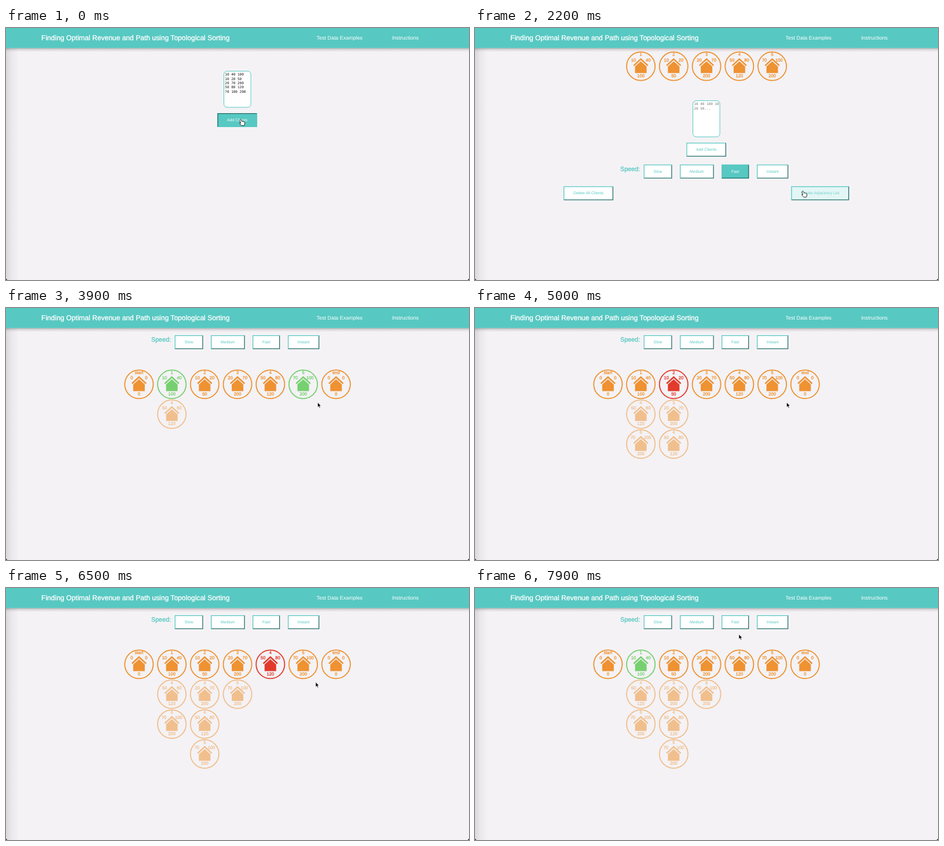
An HTML page that plays this animation: 800 px wide and 435 px high, repeating every 8000 ms.

```html
<!DOCTYPE html>
<html lang="en">
<head>
<meta charset="utf-8">
<title>Topological Sorting</title>
<style>
  html, body { margin: 0; width: 100%; height: 100%; overflow: hidden; background: #f4f2f5; }
  svg { display: block; width: 800px; height: 435px; text-rendering: geometricPrecision; }
  text { font-family: "Liberation Sans", Arial, sans-serif; fill: currentColor; }
  .round { stroke: currentColor; stroke-width: .32; stroke-linejoin: round; }
  .mono { font: 6px "DejaVu Sans Mono", monospace; }
  .mid { text-anchor: middle; }
</style>
</head>
<body>
<svg id="stage" viewBox="0 0 800 435">
  <defs>
    <linearGradient id="side">
      <stop offset="0" stop-color="#000" stop-opacity=".11"/>
      <stop offset=".4" stop-color="#000" stop-opacity=".045"/>
      <stop offset="1" stop-color="#000" stop-opacity="0"/>
    </linearGradient>
    <linearGradient id="drop" x2="0" y2="1">
      <stop offset="0" stop-color="#000" stop-opacity=".3"/>
      <stop offset=".4" stop-color="#000" stop-opacity=".1"/>
      <stop offset="1" stop-color="#000" stop-opacity="0"/>
    </linearGradient>
  </defs>
  <rect width="800" height="435" fill="#f4f2f5"/>
  <rect y="34" width="22" height="401" fill="url(#side)"/>
  <rect y="34.5" width="800" height="7" fill="url(#drop)"/>
  <rect width="800" height="34.6" fill="#57c8c2"/>
  <g color="#fff">
    <text class="round" x="61" y="21.3" font-size="12.08">Finding Optimal Revenue and Path using Topological Sorting</text>
    <text x="536.6" y="20.3" font-size="8.95">Test Data Examples</text>
    <text x="667" y="20.3" font-size="9">Instructions</text>
  </g>
  <path d="M0 432.5V435H2.5ZM800 432.5V435H797.5Z" fill="#333"/>
</svg>
<script>
const TEAL = [87, 200, 194], WHITE = [255, 255, 255];
const ORANGE = '#ee9232', GREEN = '#77d070', RED = '#e23b2c';
const LOOP = 8000, STEP = 100;
const stage = document.getElementById('stage');

function el(parent, tag, attrs = {}, text = '') {
  const node = document.createElementNS('http://www.w3.org/2000/svg', tag);
  for (const k in attrs) node.setAttribute(k, attrs[k]);
  node.textContent = text;
  return parent.appendChild(node);
}
const group = (parent, x = 0, y = 0) => el(parent, 'g', { transform: `translate(${x} ${y})` });
const mix = (a, b, p) => `rgb(${a.map((v, i) => Math.round(v + (b[i] - v) * p))})`;
const show = (node, on) => node.setAttribute('visibility', on ? 'inherit' : 'hidden');

// Linear interpolation through rows of [time, ...values].
function track(rows, t) {
  let i = 0;
  while (i < rows.length - 1 && rows[i + 1][0] <= t) i++;
  const a = rows[i], b = rows[i + 1];
  if (!b || t <= a[0]) return a.slice(1);
  const p = (t - a[0]) / (b[0] - a[0]);
  return a.slice(1).map((v, k) => v + (b[k + 1] - v) * p);
}

function button(parent, x, y, w, label) {
  const h = 24, g = group(parent, x, y), b = 1.3;
  const face = el(g, 'rect', { width: w, height: h });
  const light = el(g, 'path', { d: `M0 ${h}V0H${w}L${w - b} ${b}H${b}V${h - b}Z` });
  const dark = el(g, 'path', { d: `M0 ${h}H${w}V0L${w - b} ${b}V${h - b}H${b}Z` });
  const text = el(g, 'text', { class: 'mid', x: w / 2, y: 14.3, 'font-size': 6.9 }, label);
  const paint = (tint, pressed) => {
    face.setAttribute('fill', mix(WHITE, TEAL, tint));
    text.setAttribute('color', mix(TEAL, WHITE, tint));
    light.setAttribute('fill', pressed ? '#256f6c' : '#57c8c2');
    dark.setAttribute('fill', pressed ? '#57c8c2' : '#256f6c');
  };
  paint(0);
  return paint;
}

function speedRow(parent, y) {
  el(parent, 'text', { class: 'round', x: 251, y: y + 11.3, 'font-size': 10.7, color: '#57c8c2' }, 'Speed:');
  return [[291.5, 49, 'Slow'], [354, 58.7, 'Medium'], [426, 47.3, 'Fast'], [487, 54.3, 'Instant']]
    .map(([x, w, label]) => button(parent, x, y, w, label));
}

function textBox(parent, y, lines, color) {
  el(parent, 'rect', { x: 376.5, y: y + .5, width: 46.6, height: 62.4, rx: 5.5, fill: '#fff', stroke: '#57c8c2' });
  lines.forEach((s, i) =>
    el(parent, 'text', { class: 'mono', x: 378.3, y: y + 8.2 + i * 7.4, color }, s));
}

function client(parent, x, y, [name, from, to, pay]) {
  const g = group(parent, x, y);
  el(g, 'circle', { r: 24.6, fill: 'none', stroke: 'currentColor', 'stroke-width': 1.8 });
  el(g, 'path', { d: 'M-12.2 -1.2L0 -12.4L12.2 -1.2', fill: 'none', stroke: 'currentColor', 'stroke-width': 2.5 });
  el(g, 'path', { d: 'M0 -8.6L10 .4V11.8H-10V.4Z', fill: 'currentColor' });
  const shift = to > 99 ? -.9 : 0;
  const label = (s, dx, dy) => el(g, 'text', { class: 'mid round', x: dx, y: dy, 'font-size': 7.5 }, s);
  label(name, 0, -17.6);
  label(from, -12.6 + shift, -8.5);
  label(to, 12.6 + shift, -8.5);
  label(pay, 0, 18.9);
  g.setAttribute('color', ORANGE);
  return g;
}

const CLIENTS = [
  ['start', 0, 0, 0], [1, 10, 40, 100], [2, 10, 20, 50], [3, 20, 70, 200],
  [4, 50, 80, 120], [5, 70, 100, 200], ['end', 0, 0, 0]
];
const colX = i => 229.8 + i * 56.75;

// Input page, before and after the clients are added
const input = group(stage);
textBox(input, 74, CLIENTS.slice(1, 6).map(c => c.slice(1).join(' ')), '#111');
button(input, 365.3, 147, 68.7, 'Add Clients')(1, true);

const setup = group(stage);
CLIENTS.slice(1, 6).forEach((c, i) => client(setup, colX(i + 1), 66, c));
textBox(setup, 125, ['10 40 100 10', '20 50...'], '#757575');
const addBtn = button(setup, 365.3, 198, 68.7, 'Add Clients');
const [, mediumBtn, fastBtn] = speedRow(setup, 235.8);
button(setup, 153, 273.2, 86, 'Delete All Clients');
const createBtn = button(setup, 546.3, 273.2, 100, 'Create Adjacency List');

// Adjacency page
const graph = group(stage);
speedRow(graph, 47);
const heads = CLIENTS.map((c, i) => client(graph, colX(i), 131.7, c));

// [time, column, row, client]
const edges = [
  [3600, 1, 1, 4], [4100, 1, 2, 5], [4500, 2, 1, 3],
  [4800, 2, 2, 4], [5300, 2, 3, 5], [6000, 3, 1, 5]
].map(([at, col, row, id]) => ({ at, node: client(graph, colX(col), 131.7 + row * 51.6, CLIENTS[id]) }));

// [time, colour, lit clients]
const LIT = [
  [0, ORANGE], [3000, RED, 1], [3400, GREEN, 1, 4], [3600, RED, 1], [3800, GREEN, 1, 5],
  [4100, RED, 2], [4300, GREEN, 2, 3], [4500, RED, 2], [4600, GREEN, 2, 4],
  [4800, RED, 2], [5100, GREEN, 2, 5], [5300, RED, 3], [5800, GREEN, 3, 5],
  [6000, RED, 3], [6200, RED, 4], [6700, RED, 5], [7100, ORANGE], [7600, GREEN, 1]
];

const hand = el(stage, 'path', {
  d: 'M1 .8Q2.2 -.2 2.9 1L4.2 4Q5 3.2 5.7 4Q6.6 3.3 7.2 4.3Q8.4 3.9 8.8 5.2L9 8L8 11H3.7L.3 7.6Q-.2 6.3 1.2 6.3L2.1 7L.6 2Z',
  fill: '#fff', stroke: '#111', 'stroke-width': .9, 'stroke-linejoin': 'round'
});
const arrow = el(stage, 'path', {
  d: 'M0 0V8.2L1.9 6.5L3.2 9.4L4.6 8.8L3.3 6H5.8Z',
  fill: '#000', stroke: '#fff', 'stroke-width': .6
});

const POINTER = [
  [0, 403.5, 157.5], [500, 403.5, 157.5], [900, 384, 212], [1200, 351, 252], [1300, 354.5, 252],
  [1600, 443, 246], [1900, 445, 247], [2200, 564.5, 281], [2400, 588, 283], [2900, 588, 283],
  [3500, 538.5, 163], [6300, 538.5, 163], [6500, 535, 162.5], [7200, 533, 160], [7900, 456, 80]
];
const OVER = [[0, 300], [1300, 2000], [2200, 2800]];

function draw(t) {
  show(input, t < 300);
  show(setup, t >= 300 && t < 2800);
  show(graph, t >= 2800);

  addBtn(track([[300, .8], [600, 0]], t)[0]);
  mediumBtn(track([[1200, 0], [1300, .27], [1500, .7], [1800, 0]], t)[0]);
  fastBtn(track([[1400, 0], [1700, 1]], t)[0], t >= 1700 && t < 1900);
  createBtn(track([[2100, 0], [2200, .17], [2600, 1]], t)[0], t >= 2600);

  const [, color, ...lit] = LIT.filter(r => r[0] <= t).pop();
  heads.forEach((h, i) => h.setAttribute('color', lit.includes(i) ? color : ORANGE));
  edges.forEach(({ at, node }) =>
    node.setAttribute('opacity', track([[at - 100, 0], [at + 200, .53]], t)[0]));

  const place = `translate(${track(POINTER, t)})`;
  const pointing = OVER.some(([a, b]) => t >= a && t < b);
  hand.setAttribute('transform', place);
  arrow.setAttribute('transform', place);
  show(hand, pointing);
  show(arrow, !pointing);
}

const begin = performance.now();
function tick() {
  const t = (performance.now() - begin) % LOOP;
  draw(Math.floor(t / STEP) * STEP);
  requestAnimationFrame(tick);
}
tick();
</script>
</body>
</html>
```
